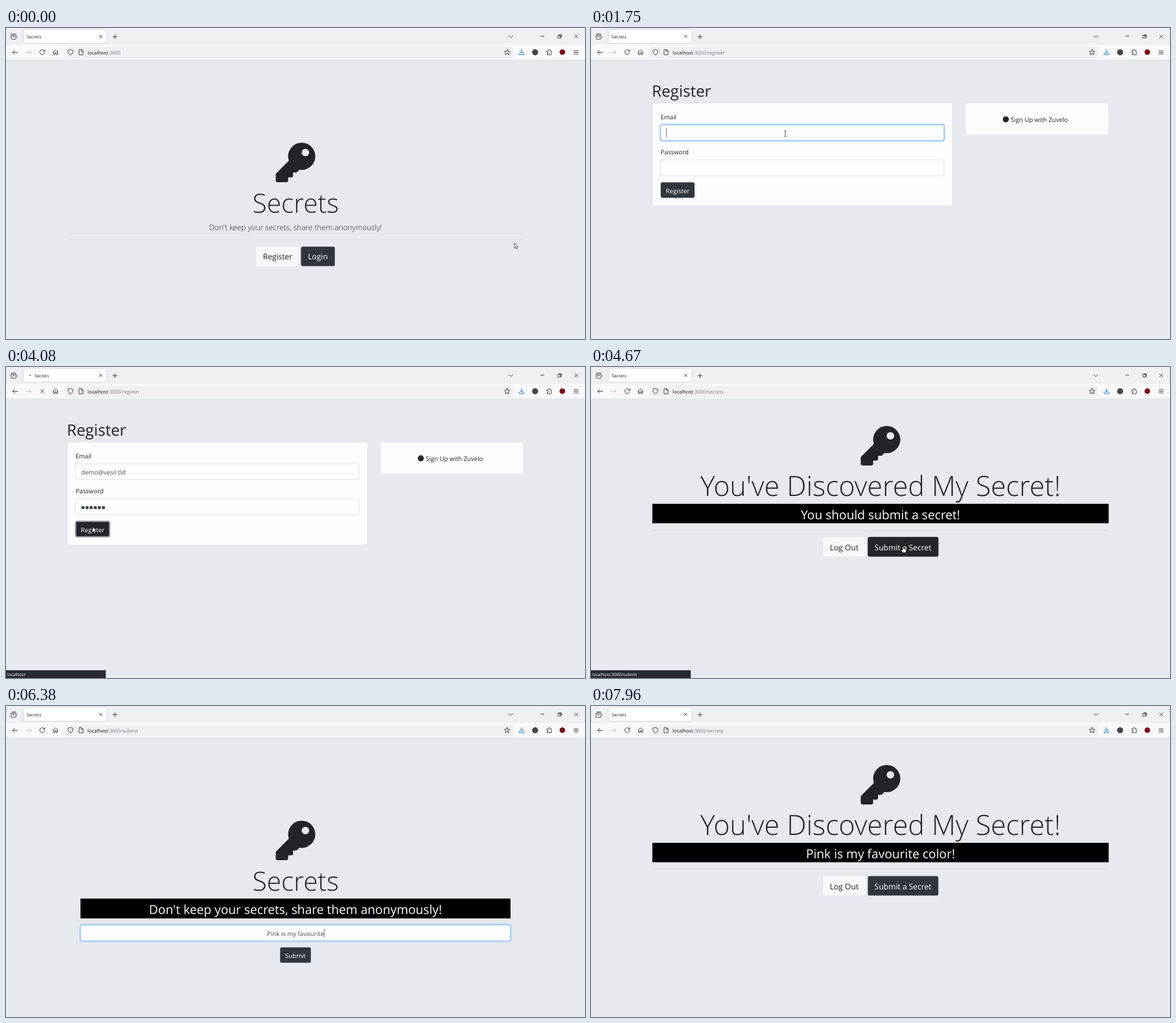
An HTML page for the animation above (8000 ms loop, 894 px wide and 480 px high).

```html
<!DOCTYPE html>
<html lang="en">
<head>
<meta charset="utf-8">
<title>Secrets</title>
<style>
html, body { margin: 0; width: 100%; height: 100%; overflow: hidden; background: #e6eaee; }
svg { display: block; width: 100%; height: 100%; }
text { font-family: "Open Sans", "Noto Sans", sans-serif; font-size: 9.65px; fill: #212529; text-rendering: geometricPrecision; white-space: pre; }
.mid { text-anchor: middle; }
.title { font-size: 40.6px; font-weight: 300; text-anchor: middle; }
.headline { font-size: 42.9px; font-weight: 300; text-anchor: middle; }
.lead { font-size: 11.8px; font-weight: 300; text-anchor: middle; }
.banner { font-size: 19.2px; fill: #fff; text-anchor: middle; }
.large { font-size: 12.05px; text-anchor: middle; }
.heading { font-size: 24.2px; }
.chrome { font-size: 6.65px; fill: #15141a; }
.address { font-size: 7.55px; fill: #7b7b84; }
.address .host { fill: #15141a; }
.white { fill: #fff; }
.typed { fill: #495057; }
.hint { fill: #6c757d; }
.light { fill: #f7f8f9; }
.dark { fill: #30363c; }
.pressed { fill: #22262a; stroke: #8e9499; stroke-width: 2; }
.hover { fill: #e1e5e9; stroke: #d9dfe4; stroke-width: .7; }
.card { fill: #fcfdfd; stroke: #dfe3e6; stroke-width: .6; }
.field { fill: #fdfdfe; stroke: #d3d8dd; stroke-width: .7; }
.glow { fill: none; stroke: #b9d7f6; stroke-width: 2.4; }
.edge { fill: none; stroke: #86bdf5; stroke-width: .7; }
.rule { stroke: #d4d7dc; stroke-width: .8; }
.caret { stroke: #333; stroke-width: .7; }
.icon { fill: none; stroke: #38373f; stroke-width: .9; stroke-linecap: round; stroke-linejoin: round; }
.pointer { fill: #fff; stroke: #222; stroke-width: .7; stroke-linejoin: round; }
#cursor { animation: travel 8s ease-in-out infinite; }
#spinner { transform-origin: 37.5px 13px; animation: pulse .5s ease-in-out infinite alternate; }
@keyframes pulse { from { transform: scaleX(.5); } to { transform: scaleX(1); } }
@keyframes travel {
  0%, 1.25% { transform: translate(785px, 332px); }
  10.375%, 18.1% { transform: translate(415px, 348px); }
  20.4%, 46.25% { transform: translate(300px, 163px); }
  49.4%, 52.5% { transform: translate(134px, 247px); }
  56.9%, 62.3% { transform: translate(482px, 277px); }
  65%, 88.1% { transform: translate(444px, 357px); }
  90.625% { transform: translate(446px, 376px); }
  91.5%, 93.75% { transform: translate(447px, 385px); }
  98.75%, 100% { transform: translate(537px, 228px); }
}
</style>
</head>
<body>
<svg viewBox="0 0 894 480">
  <defs>
    <g id="key">
      <path fill="#212529" d="M437 204.5 417.3 224.2Q416.5 225 416.5 226.2V235.3Q416.5 238 419.4 238H432.8Q435.6 238 435.6 235.3V230.5H440.4Q443.3 230.5 443.3 227.6V222.9H447.7Q449 222.9 449.9 222L454 217.5Z"/>
      <circle cx="456.6" cy="198" r="21" fill="#212529"/>
      <circle cx="462.3" cy="192.2" r="5.8" fill="#e6eaee"/>
    </g>
  </defs>

  <rect width="894" height="480" fill="#e6eaee"/>

  <!-- Home -->
  <g data-on="0 1480">
    <rect y="49" width="894" height="360" fill="#e6e9ee"/>
    <use href="#key"/>
    <text class="title" x="447.3" y="285">Secrets</text>
    <text class="lead" x="447" y="312">Don't keep your secrets, share them anonymously!</text>
    <path class="rule" d="M95 326.7H799"/>
    <rect class="light" x="386" y="337.4" width="67" height="30.2" rx="3"/>
    <rect class="hover" data-on="800 1480" x="386" y="337.4" width="67" height="30.2" rx="3"/>
    <text class="large" x="419.5" y="357">Register</text>
    <rect class="dark" x="455.5" y="337.5" width="52.2" height="30" rx="2.5"/>
    <text class="large white" x="481.5" y="357">Login</text>
  </g>

  <!-- Registration form -->
  <g data-on="1480 4280">
    <text class="heading" x="94" y="105.5">Register</text>
    <rect class="card" x="95" y="116" width="463" height="158.5" rx="2.5"/>
    <text x="107.5" y="140.5">Email</text>
    <rect class="field" x="107.5" y="149.5" width="437.5" height="24" rx="2.5"/>
    <text x="107.5" y="195">Password</text>
    <rect class="field" x="107.5" y="204" width="437.5" height="24" rx="2.5"/>
    <g data-on="1700 3200">
      <rect class="glow" x="106.8" y="148.8" width="439" height="25.4" rx="3"/>
      <rect class="edge" x="107.5" y="149.5" width="437.5" height="24" rx="2.5"/>
    </g>
    <g data-on="3200 3950">
      <rect class="glow" x="106.8" y="203.3" width="439" height="25.4" rx="3"/>
      <rect class="edge" x="107.5" y="204" width="437.5" height="24" rx="2.5"/>
    </g>
    <text id="email" class="typed" x="116" y="165.5"></text>
    <path id="emailCaret" class="caret" d="M0 155V168"/>
    <path id="dots" fill="none" stroke="#3f464c" stroke-width="5" stroke-linecap="round" stroke-dasharray="0 6.35"/>
    <rect class="dark" x="107.6" y="238.2" width="52.3" height="23.8" rx="2.5"/>
    <rect class="pressed" data-on="3980 4280" x="107.6" y="238.2" width="52.3" height="23.8" rx="2.5"/>
    <text class="mid white" x="133.8" y="254.5">Register</text>
    <rect class="card" x="578" y="116" width="221" height="49" rx="2.5"/>
    <circle cx="640.5" cy="141" r="4.7" fill="#212529"/>
    <text x="648" y="145">Sign Up with Zuvelo</text>
  </g>

  <!-- Revealed secret -->
  <g data-on="4280 4980 7480 8000">
    <rect y="49" width="894" height="284" fill="#e6e9ee"/>
    <use href="#key" y="-86"/>
    <text class="headline" x="447" y="199">You've Discovered My Secret!</text>
    <rect x="94.7" y="211.2" width="704.6" height="30"/>
    <text id="secret" class="banner" x="447" y="235"></text>
    <path class="rule" d="M95 252H799"/>
    <rect class="light" x="358" y="262.4" width="66.5" height="30.2" rx="3"/>
    <text class="large" x="391" y="282.5">Log Out</text>
    <rect class="dark" x="427.5" y="262.5" width="108.8" height="30" rx="2.5"/>
    <rect data-on="4520 4980" fill="#22262a" x="427.5" y="262.5" width="108.8" height="30" rx="2.5"/>
    <text class="large white" x="481.7" y="282.5">Submit a Secret</text>
  </g>

  <!-- Secret submission -->
  <g data-on="4980 7480">
    <rect x="97" y="49" width="700" height="388" fill="#e6e9ee"/>
    <use href="#key"/>
    <text class="title" x="447.3" y="285">Secrets</text>
    <rect x="115" y="297.2" width="664" height="30.6"/>
    <text class="banner" x="447" y="321">Don't keep your secrets, share them anonymously!</text>
    <rect class="field" x="115" y="338" width="664" height="24.5" rx="2.5"/>
    <g data-on="5230 7480">
      <rect class="glow" x="114.3" y="337.3" width="665.4" height="25.9" rx="3"/>
      <rect class="edge" x="115" y="338" width="664" height="24.5" rx="2.5"/>
    </g>
    <text class="mid hint" data-on="4980 5600" x="447" y="354.5">What's your secret?</text>
    <text id="entry" class="mid typed" x="447" y="354.5"></text>
    <path id="entryCaret" class="caret" d="M0 344V357"/>
    <rect class="dark" x="423.3" y="372.6" width="47.4" height="23.6" rx="2.5"/>
    <rect class="pressed" data-on="7350 7480" x="423.3" y="372.6" width="47.4" height="23.6" rx="2.5"/>
    <text class="mid white" x="447" y="388.5">Submit</text>
  </g>

  <!-- Browser window -->
  <rect width="894" height="27" fill="#f0f0f4"/>
  <rect y="26" width="894" height="23" fill="#f9f9fb"/>
  <path d="M0 49.2H894" stroke="#d9dade" stroke-width=".7"/>
  <path d="M24.5 2V24" stroke="#dfdfe5" stroke-width=".6"/>
  <rect x="27" y="2" width="129" height="21.5" rx="2.5" fill="#fff" stroke="#c9c9d1" stroke-width=".7"/>
  <rect x="91" y="29" width="692" height="18" rx="2.5" fill="#f0f0f4"/>
  <text id="tab" class="chrome" y="15.5">Secrets</text>
  <rect id="spinner" data-on="1250 1560 4000 4350 4700 5080 7360 7600" x="35" y="12.2" width="5" height="1.6" rx=".8" fill="#38373f"/>
  <text class="address" x="126" y="40.7"><tspan class="host">localhost</tspan>:3000<tspan id="path"></tspan></text>
  <g class="icon">
    <path d="M8 11.5V16Q8 17.3 9.3 17.3H14.3Q15.6 17.3 15.6 16V11.5M7.6 11.2H16M8.8 9.2H14.8M10.4 13.4H13.2"/>
    <path d="M144.3 11l4 4m0-4-4 4M165 13.5h6.4m-3.2-3.2v6.4M776.3 11.7l3.2 3 3.2-3"/>
    <path d="M825.5 12.5h5M852.5 11.5h4v4h-4zM853.5 11.5v-1h4V14.5H856.5M878 10.5l5 5m0-5-5 5"/>
    <path d="M18 37.5H10.3M13.5 34.2l-3.3 3.3 3.3 3.3"/>
    <path stroke="#bdbdc3" d="M31 37.5H38.7M35.5 34.2l3.3 3.3-3.3 3.3"/>
    <path data-on="0 1300 1480 4000 4280 4700 4980 7360 7480 8000" d="M59.2 35.3A3.8 3.8 0 1 0 59.7 38M60 33.5V36H57.4"/>
    <path data-on="1300 1340" d="M53 38A3.4 3.4 0 0 1 55.5 34.5M54 33.2 56 34.5 54.8 36.3"/>
    <path data-on="1340 1480 4000 4280 4700 4980 7360 7480" d="M53.3 34.7l5.4 5.4m0-5.4-5.4 5.4"/>
    <path d="M72.5 37.6 76.5 33.7 80.5 37.6M73.5 37V41H75.5V38.5H77.5V41H79.5V37"/>
    <path d="M99.5 33.2 103.3 34.6Q103.5 39.8 99.5 41.8 95.5 39.8 95.7 34.6Z"/>
    <path d="M113.2 33.5H116.8L119 35.7V41.3H113.2ZM116.6 33.7V36H119"/>
    <path d="M773.8 33 775.1 36 778.2 36.2 775.8 38.2 776.6 41.4 773.8 39.6 771 41.4 771.8 38.2 769.4 36.2 772.5 36Z"/>
    <path stroke="#0a70d8" d="M796 33.3V38.6M793.5 36.3 796 38.8 798.5 36.3M792.3 39V41H799.7V39"/>
    <path d="M835.5 35.2H837.3Q837 33 838.6 33 840.2 33 839.9 35.2H842V41.2H835.5V39.3Q837.4 39.5 837.4 38.2 837.4 37 835.5 37.2Z"/>
    <path d="M877 35h6.5M877 37.5h6.5M877 40h6.5"/>
  </g>
  <circle cx="817" cy="37.5" r="4.7" fill="#45444c"/>
  <circle cx="859" cy="37.3" r="4.3" fill="#7c0a18"/>

  <g id="status" data-on="900 1480 4000 4280 4600 4980">
    <rect y="468" width="154" height="12" fill="#2b2a33"/>
    <text id="statusText" class="chrome white" x="2" y="477"></text>
  </g>

  <g id="cursor">
    <path class="pointer" data-on="0 800 1480 1620 3700 4520 4980 5130 7480 7850" d="M0 0V8L1.9 6.3 3.2 9 4.5 8.4 3.3 5.8H5.7Z"/>
    <path class="pointer" data-on="800 1480 4520 4980 7300 7480" d="M-.9.7Q0-.6.8.7V3.6L4.2 4.5Q5 5 4.7 6.5L4 9.6H-.4L-3 6Q-3 4.6-.9 5.8Z"/>
    <path fill="none" stroke="#222" stroke-width=".8" data-on="1620 2200 3600 3700 5130 5700 6900 7300 7850 8000" d="M-1.6-4.5Q0-4.5 0-3.5 0-4.5 1.6-4.5M0-3.5V3.5M-1.6 4.5Q0 4.5 0 3.5 0 4.5 1.6 4.5"/>
  </g>
</svg>
<script>
const EMAIL = "demo@vesil.tld";
const SECRET = "Pink is my favourite color!";
const INVITE = "You should submit a secret!";
const PATHS = [[0, ""], [1250, "/register"], [4280, "/secrets"], [4720, "/submit"], [7480, "/secrets"]];
const LINKS = [[0, ":3000/register"], [1250, ""], [4600, ":3000/submit"], [4700, ""]];

const $ = id => document.getElementById(id);
const timed = [...document.querySelectorAll("[data-on]")].map(el => ({
  el, times: el.dataset.on.split(" ").map(Number)
}));
const travel = $("cursor").getAnimations()[0];
const loadTimes = timed.find(({ el }) => el.id === "spinner").times;

const within = (t, times) => times.some((start, i) => i % 2 === 0 && t >= start && t < times[i + 1]);
const latest = (t, steps) => steps.filter(([start]) => start <= t).pop()[1];
const count = (t, start, pace, max) => Math.max(0, Math.min(max, Math.floor((t - start) / pace)));
const show = (el, on) => { el.style.display = on ? "" : "none"; };
const setText = (el, value) => { if (el.textContent !== value) el.textContent = value; };

function placeCaret(el, x, t, start, end, typingStart, typingEnd) {
  const typing = t >= typingStart && t < typingEnd;
  const since = t < typingStart ? t - start : t - typingEnd;
  show(el, t >= start && t < end && (typing || since % 1000 < 500));
  el.setAttribute("transform", `translate(${x} 0)`);
}

function render(t) {
  for (const { el, times } of timed) show(el, within(t, times));
  $("tab").setAttribute("x", within(t, loadTimes) ? 44 : 32);
  setText($("path"), latest(t, PATHS));
  setText($("statusText"), "localhost" + latest(t, LINKS));
  setText($("secret"), t < 7000 ? INVITE : SECRET);

  const email = $("email"), entry = $("entry");
  setText(email, EMAIL.slice(0, count(t, 2250, 60, EMAIL.length)));
  setText(entry, SECRET.slice(0, count(t, 5570, 38, SECRET.length)));
  placeCaret($("emailCaret"), 116.5 + email.getComputedTextLength(), t, 1700, 3200, 2250, 3100);
  placeCaret($("entryCaret"), 447.3 + entry.getComputedTextLength() / 2, t, 5230, 7480, 5570, 6630);

  const dots = count(t, 3260, 70, 6);
  $("dots").setAttribute("d", dots ? `M118.8 217h${(dots - 1) * 6.35 + .1}` : "");
}

function tick() {
  render((travel.currentTime ?? 0) % 8000);
  requestAnimationFrame(tick);
}
tick();
</script>
</body>
</html>
```
